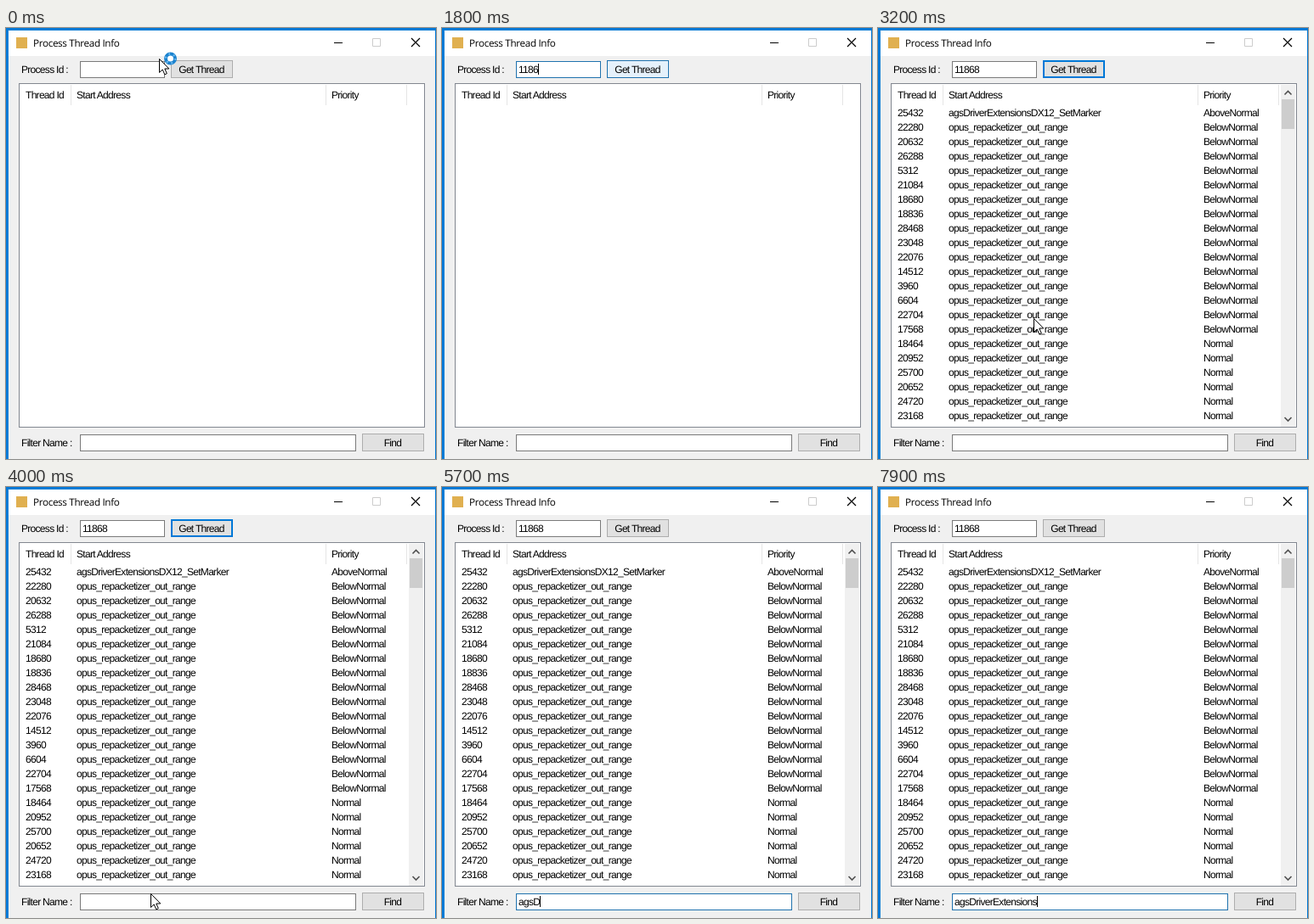
An HTML page for the animation above (8000 ms loop, 506 by 508 pixels).

```html
<!DOCTYPE html>
<html lang="en">
<head>
<meta charset="utf-8">
<title>Process Thread Info</title>
<style>
  html, body { margin: 0; width: 100%; height: 100%; overflow: hidden; background: #f0f0f0; }
  svg { display: block; width: 506px; height: 508px; }
  text { font: 12px "Liberation Sans", Arial, sans-serif; letter-spacing: -.7px; fill: #000; text-rendering: geometricPrecision; white-space: pre; }
  .title { font: 11.7px "Open Sans", "Noto Sans", sans-serif; letter-spacing: -.33px; }
  rect { shape-rendering: crispEdges; }
</style>
</head>
<body>
<svg id="stage" viewBox="0 0 506 508"></svg>
<script>
const LOOP = 8000, STEP = 100;
const BLUE = '#0078d7', THIN_BLUE = '#1f72ae';
const stage = document.getElementById('stage');

function add(tag, attrs, parent = stage) {
  const node = document.createElementNS('http://www.w3.org/2000/svg', tag);
  set(node, attrs);
  return parent.appendChild(node);
}
function set(node, attrs) {
  for (const key in attrs) node.setAttribute(key, attrs[key]);
}
function fillRect(x, y, width, height, fill, parent) {
  return add('rect', { x, y, width, height, fill }, parent);
}
function box(x, y, width, height, fill, stroke) {
  return add('rect', { x: x + .5, y: y + .5, width: width - 1, height: height - 1, fill, stroke });
}
function label(x, y, content, attrs = {}, parent) {
  const node = add('text', { x, y, ...attrs }, parent);
  node.textContent = content;
  return node;
}
function line(d, stroke, width = 1, parent) {
  return add('path', { d, stroke, fill: 'none', 'stroke-width': width }, parent);
}
function show(node, visible) {
  node.setAttribute('visibility', visible ? 'visible' : 'hidden');
}

// Desktop edge, window frame and title bar
fillRect(0, 0, 506, 508, BLUE);
fillRect(2, 2, 503, 506, '#1883d7');
fillRect(3, 3, 502, 505, '#f0f0f0');
fillRect(3, 3, 502, 30, '#fff');
fillRect(12, 11, 13, 13, '#e0b050');
label(32, 21.6, 'Process Thread Info', { class: 'title' });
line('M386 17.5h10', '#000');
line('M431.5 12.5h9v9h-9z', '#ccc');
line('M477 12l10 10M487 12l-10 10', '#000', 1.2);

// Controls
label(18, 53, 'Process Id :');
label(18, 493, 'Filter Name :');

function textField(x, y, width) {
  const frame = box(x, y, width, 20, '#fff', '#7a7a7a');
  const value = label(x + 3, y + 14, '');
  const caret = fillRect(x + 3, y + 3, 1, 13, '#000');
  return (content, focused) => {
    frame.setAttribute('stroke', focused ? THIN_BLUE : '#7a7a7a');
    value.textContent = content;
    const length = content ? value.getComputedTextLength() : 0;
    caret.setAttribute('x', Math.round(x + 3 + length));
    show(caret, focused);
  };
}
function button(x, y, content) {
  const face = box(x, y, 73, 21, '#e1e1e1', '#adadad');
  label(x + 36, y + 15, content, { 'text-anchor': 'middle' });
  return face;
}
const setProcess = textField(87, 39, 100);
const setFilter = textField(87, 479, 325);
const getButton = button(194, 38, 'Get Thread');
const focusEdge = add('rect', { x: 195, y: 39, width: 71, height: 19, fill: 'none', stroke: BLUE, 'stroke-width': 2 });
button(419, 478, 'Find');

// Thread list
box(15, 65, 478, 406, '#fff', '#828790');
for (const x of [76, 376, 471]) fillRect(x, 67, 1, 24, '#e5e5e5');
const columns = [23, 83, 383];
['Thread Id', 'Start Address', 'Priority'].forEach((name, i) => label(columns[i], 83, name));

const list = add('g', {});
const ids = [25432, 22280, 20632, 26288, 5312, 21084, 18680, 18836, 28468, 23048, 22076,
  14512, 3960, 6604, 22704, 17568, 18464, 20952, 25700, 20652, 24720, 23168];
ids.forEach((id, i) => {
  const address = i ? 'opus_repacketizer_out_range' : 'agsDriverExtensionsDX12_SetMarker';
  const priority = i === 0 ? 'AboveNormal' : i < 16 ? 'BelowNormal' : 'Normal';
  [id, address, priority].forEach((cell, c) => label(columns[c], 104 + 17 * i, cell, {}, list));
});
fillRect(474, 67, 17, 403, '#f0f0f0', list);
fillRect(475, 84, 15, 35, '#cdcdcd', list);
line('M478.5 78.5l4-4 4 4', '#505050', 1.6, list);
line('M478.5 459l4 4 4-4', '#505050', 1.6, list);

// Pointers
const arrow = add('g', {});
add('path', {
  d: 'M.5 .5V16.5L4.2 13L6.8 18.8L9.3 17.7L6.8 12H11.8Z',
  fill: '#fff', stroke: '#000', 'stroke-linejoin': 'round'
}, arrow);
const beam = add('g', {});
line('M-3.5-8.5h2.5l1 1 1-1h2.5M0-7.5v15M-3.5 8.5h2.5l1-1 1 1h2.5', '#000', 1, beam);
const busy = add('g', {});
add('circle', { r: 5.5, fill: '#fff', stroke: '#1c83cf', 'stroke-width': 4 }, busy);
const spinner = add('circle', { r: 5.5, fill: 'none', stroke: '#6bb8ee', 'stroke-width': 2.5, 'stroke-dasharray': '1.8 3.96' }, busy);

// Pointer path: time, x, y
const path = [
  [0, 180, 36], [100, 176, 37], [400, 122, 48], [600, 122, 48], [900, 222, 44],
  [1100, 226, 47], [1300, 226, 47], [1400, 245, 53], [2000, 245, 53],
  [2200, 212, 47], [2700, 212, 47], [3500, 170, 479], [4000, 170, 479], [4300, 160, 489]
];
function pointerAt(t) {
  const next = path.findIndex(p => p[0] > t);
  if (next < 0) return path[path.length - 1].slice(1);
  const [t0, x0, y0] = path[next - 1], [t1, x1, y1] = path[next];
  const k = (t - t0) / (t1 - t0), e = k * k * (3 - 2 * k);
  return [x0 + (x1 - x0) * e, y0 + (y1 - y0) * e].map(Math.round);
}

// Number of typed characters, one per key time
const processKeys = [1400, 1500, 1700, 1800, 2000];
const filterKeys = [5100, 5200, 5400, 5700, 5900, 6000, 6100, 6200, 6400, 6500, 6600, 6700,
  6900, 7000, 7400, 7500, 7600, 7700, 7900];
const typed = (content, keys, t) => content.slice(0, keys.filter(k => k <= t).length);
const inside = (x, y, left, top, width, height) =>
  x >= left && x < left + width && y >= top && y < top + height;

function render(t) {
  const [x, y] = pointerAt(t);
  const hidden = (t >= 1500 && t < 2000) || t >= 5100;
  const overField = inside(x, y, 88, 40, 98, 18) || inside(x, y, 88, 481, 323, 17);
  const hot = inside(x, y, 194, 38, 73, 21);
  const buttonFocused = t >= 2300 && t < 4500;

  setProcess(typed('11868', processKeys, t), t >= 500 && t < 2300);
  setFilter(typed('agsDriverExtensions', filterKeys, t), t >= 4500);
  set(getButton, {
    fill: hot ? '#e5f1fb' : '#e1e1e1',
    stroke: hot || buttonFocused ? THIN_BLUE : '#adadad'
  });
  show(focusEdge, buttonFocused && !hot);
  show(list, t >= 2300);

  show(arrow, !hidden && !overField);
  show(beam, !hidden && overField);
  show(busy, t < 300);
  set(arrow, { transform: `translate(${x} ${y})` });
  set(beam, { transform: `translate(${x + .5} ${y})` });
  set(busy, { transform: `translate(${x + 13.5} ${y})` });
  set(spinner, { transform: `rotate(${t * .36})` });
}

const start = performance.now();
function tick() {
  const t = (performance.now() - start) % LOOP;
  render(Math.floor(t / STEP) * STEP);
  requestAnimationFrame(tick);
}
tick();
</script>
</body>
</html>
```
